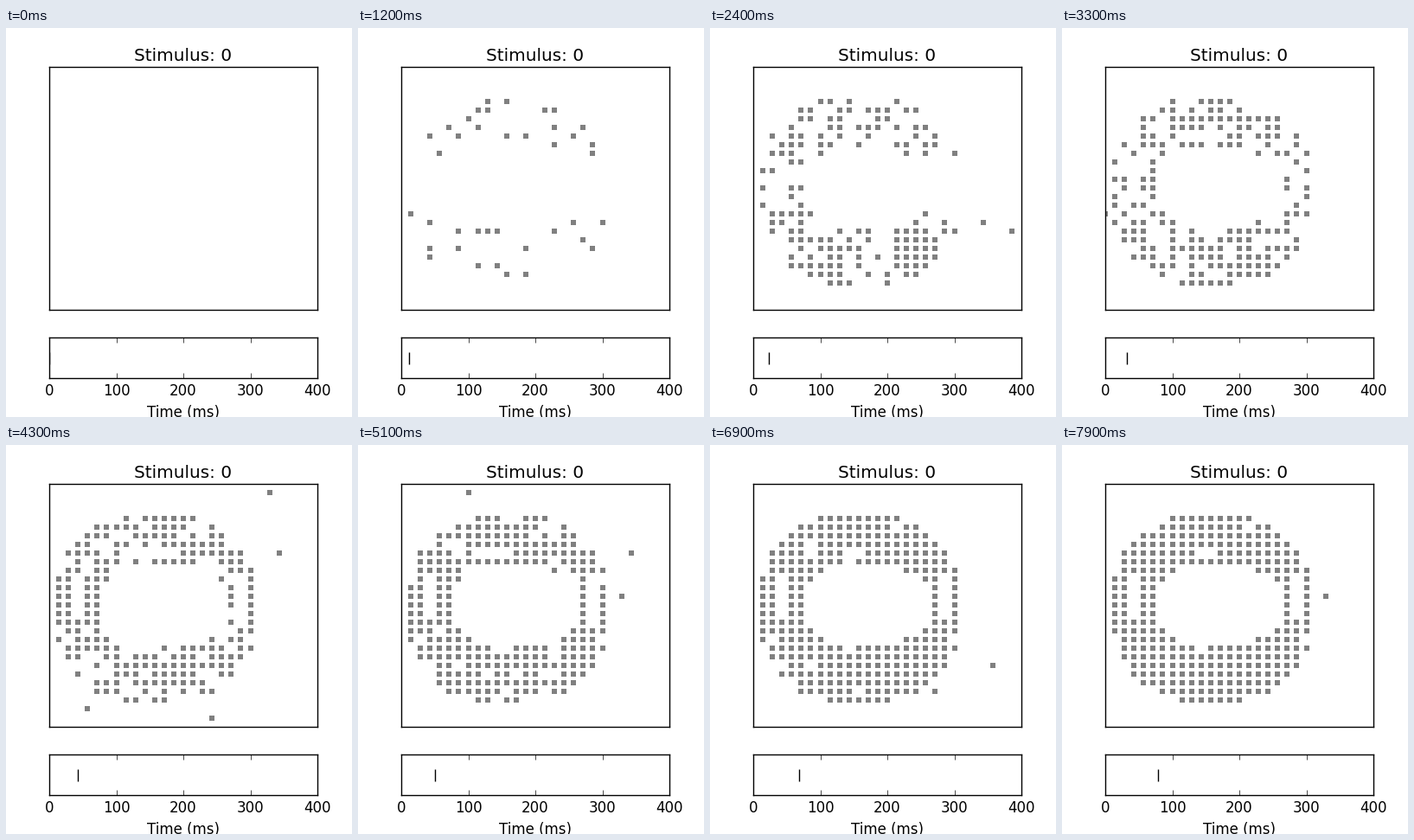
Write a matplotlib script that moves like this. It is 400 by 450 pixels and loops after 8 s.

```python
import matplotlib.pyplot as plt
import numpy as np
from matplotlib.animation import FuncAnimation

plt.style.use("classic")
plt.rcParams.update({"font.family": "DejaVu Sans", "figure.facecolor": "white",
                     "text.kerning_factor": 0})

FRAMES = 80     # one frame per simulated millisecond
HOLD = 10       # how long a spike stays visible
GRID = 28
STRAYS = 22
PX_PER_MS = 310 / 400


def in_oval(col, row, cx, cy, a, b, power):
    return abs((col - cx) / a) ** power + abs((row - cy) / b) ** power < 1


def in_ring(col, row):
    """Cells shaped like a wide digit zero, thin at the hollow side walls."""
    if col in (3, 20) and 10 < row < 16:
        return False
    return (in_oval(col, row, 11.1, 14.4, 10.4, 10.9, 2.5)
            and not in_oval(col, row, 11.9, 14, 6.9, 4.95, 2))


def edge_share(col, row):
    steps = ((0, 1), (0, -1), (1, 0), (-1, 0))
    return sum(not in_ring(col + dx, row + dy) for dx, dy in steps) / 4


def spike_train(col, row, rng):
    """Spikes of one cell; intervals shorten as the drive builds up."""
    edge = edge_share(col, row)
    side_delay = 8 * (abs(row - 13.5) < 3) * (1 + (col > GRID / 2))
    t = max(6, int(rng.normal(19 + 4 * edge, 7)) + side_delay)
    while t < FRAMES:
        yield col, row, t
        t += 8 + int(rng.exponential(45 * np.exp(-t / 12.5) + 2 * edge))


def make_spikes():
    rng = np.random.default_rng(4)
    spikes = [(12, 3, 1)]
    for row in range(1, GRID + 1):
        for col in range(GRID):
            if in_ring(col, row):
                spikes += spike_train(col, row, rng)
    for t in np.linspace(20, 75, STRAYS):
        spikes.append((rng.integers(GRID), rng.integers(1, GRID + 1), int(t)))
    return np.array(spikes)


spikes = make_spikes()

fig, (ax, bar) = plt.subplots(2, 1, figsize=(4, 4.5), dpi=100,
                              gridspec_kw={"height_ratios": [6, 1]})
ax.set(xlim=(0, GRID), ylim=(GRID, 0), xticks=[], yticks=[])
ax.set_title("Stimulus: 0")
bar.set(xlim=(0, 400), ylim=(0, 1), yticks=[], xticks=range(0, 401, 100))
bar.set_xlabel("Time (ms)")

dots, = ax.plot([], [], "s", color="0.5", markersize=4, markeredgewidth=0)
cursor, = bar.plot([0], [0.5], "|", color="k", markersize=10, markeredgewidth=1)


def draw(t):
    age = t - spikes[:, 2]
    lit = spikes[(age >= 0) & (age < HOLD)]
    dots.set_data(lit[:, 0], lit[:, 1])
    cursor.set_data([np.floor(t * PX_PER_MS) / PX_PER_MS], [0.5])
    return dots, cursor


anim = FuncAnimation(fig, draw, frames=FRAMES, interval=100,
                     init_func=lambda: draw(0), repeat=True, repeat_delay=0)
plt.show()
```
